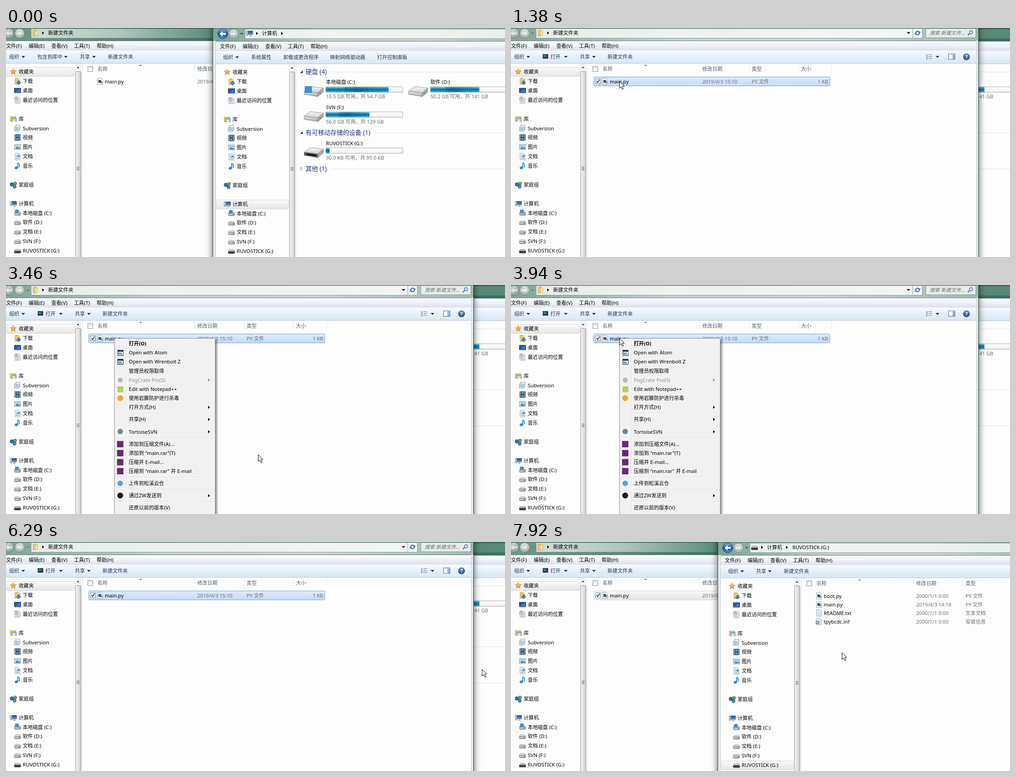
An HTML page with a canvas that plays this animation: 1101 px wide and 508 px high, repeating every 8 s.

```html
<!DOCTYPE html>
<html lang="zh-CN">
<head>
<meta charset="utf-8">
<style>
html, body { margin: 0; width: 100%; height: 100%; overflow: hidden; background: #fdfdfd; }
canvas { display: block; }
</style>
</head>
<body>
<canvas id="stage" width="1101" height="508"></canvas>
<script>
const ctx = document.getElementById('stage').getContext('2d');
const FONT = '"Noto Sans", "Noto Sans CJK SC", sans-serif';
const LOOP = 8000, PICK = 1380, SWITCH = 6360, OPEN = 7300;
const STICK = 'RUVOSTICK (G:)';
const GREY = '#6d6d6d', HEAD = '#4c607a', BAR = '#1e395b';

// Drawing helpers
function rect(x, y, w, h, fill, stroke) {
  if (fill) { ctx.fillStyle = fill; ctx.fillRect(x, y, w, h); }
  if (stroke) { ctx.strokeStyle = stroke; ctx.lineWidth = 1; ctx.strokeRect(x + .5, y + .5, w - 1, h - 1); }
}
function rounded(x, y, w, h, r, fill, stroke) {
  ctx.beginPath();
  ctx.roundRect(x + .5, y + .5, w - 1, h - 1, r);
  paint(fill, stroke);
}
function paint(fill, stroke, width = 1) {
  if (fill) { ctx.fillStyle = fill; ctx.fill(); }
  if (stroke) { ctx.strokeStyle = stroke; ctx.lineWidth = width; ctx.stroke(); }
}
function poly(pts, fill, stroke) {
  ctx.beginPath();
  for (let i = 0; i < pts.length; i += 2) ctx.lineTo(pts[i], pts[i + 1]);
  ctx.closePath();
  paint(fill, stroke);
}
function disc(x, y, r, fill, stroke, width) {
  ctx.beginPath();
  ctx.arc(x, y, r, 0, 7);
  paint(fill, stroke, width);
}
function line(x1, y1, x2, y2, color, width = 1) {
  ctx.beginPath();
  ctx.moveTo(x1, y1);
  ctx.lineTo(x2, y2);
  paint(null, color, width);
}
function shade(x0, y0, x1, y1, ...colors) {
  const g = ctx.createLinearGradient(x0, y0, x1, y1);
  colors.forEach((c, i) => g.addColorStop(i / (colors.length - 1), c));
  return g;
}
const vert = (y, h, ...colors) => shade(0, y, 0, y + h, ...colors);

// y is the middle of the line of text
function text(s, x, y, color = '#000', size = 11.1, style = '', align = 'left') {
  ctx.font = `${style} ${size}px ${FONT}`;
  ctx.textAlign = align;
  ctx.fillStyle = color;
  ctx.fillText(s, x, y + size * .37);
}
const down = (x, y, c = BAR) => poly([x - 4, y - 2, x + 4, y - 2, x, y + 2.5], c);
const right = (x, y, c = '#000') => poly([x - 2, y - 3.5, x + 2, y, x - 2, y + 3.5], c);

function checkbox(x, y, on) {
  rect(x, y, 12, 12, vert(y, 12, '#e4e6e8', '#fff'), '#8e8f8f');
  if (!on) return;
  ctx.beginPath();
  ctx.moveTo(x + 3, y + 6);
  ctx.lineTo(x + 5, y + 9);
  ctx.lineTo(x + 9.5, y + 2.5);
  paint(null, '#1f3a73', 1.7);
}

// Small icons, centred on 0,0
const page = () => poly([-5, -7, 3, -7, 6, -4, 6, 7, -5, 7], '#fbfcfd', '#8a9bab');
const lines = c => { for (let y = -3; y < 6; y += 2.5) line(-3, y, 4, y, c); };
const icons = {
  star() {
    const pts = [];
    for (let i = 0; i < 10; i++) {
      const r = i % 2 ? 3 : 7, a = i * Math.PI / 5 - Math.PI / 2;
      pts.push(r * Math.cos(a), r * Math.sin(a));
    }
    poly(pts, vert(-7, 14, '#ffd07a', '#f08a1c'), '#d9822b');
  },
  folder() {
    poly([-5, -6, 1, -7, 1, 6, -5, 7], '#f1cf6a', '#c99b3c');
    poly([-1, -4, 5, -5, 5, 5, -1, 7], '#fbe59b', '#d2a84c');
  },
  download() {
    icons.folder();
    poly([1, -1, 5, -1, 5, 3, 8, 3, 3, 8, -2, 3, 1, 3], '#2f8fe0', '#1d5fa8');
  },
  desktop() {
    rect(-7, -6, 15, 12, vert(-6, 12, '#2a63c4', '#163a86'), '#24405f');
    rect(-7, 4, 15, 2, '#6fa0d8');
    poly([-5, 3, 6, -4, 6, 3], 'rgba(110,190,255,.45)');
  },
  recent() {
    page(); lines('#7f98b0');
    disc(-3, -3, 3.5, '#eaf2f9', '#6d8499');
    line(-3, -5, -3, -3, '#345'); line(-3, -3, -1, -3, '#345');
  },
  library() {
    rect(-7, -6, 13, 11, '#f6d57d', '#c99b3c');
    rect(-4, -3, 11, 9, '#8cc8ee', '#4287b8');
    rect(-2, 1, 7, 5, '#fbe59b');
  },
  docs() {
    rect(-4, -7, 10, 11, '#fff', '#7f95ab');
    rect(-7, -3, 11, 10, '#f4f8fb', '#7f95ab');
    for (let y = 0; y < 6; y += 2) line(-5, y, 2, y, '#6b8cad');
  },
  video() {
    rect(-6, -7, 13, 14, '#243447');
    for (let y = -6; y < 7; y += 3) { rect(-5, y, 2, 2, '#d7e0e8'); rect(4, y, 2, 2, '#d7e0e8'); }
    rect(-2, -6, 5, 5, '#4f9bd0'); rect(-2, 1, 5, 5, '#4f9bd0');
  },
  picture() {
    rect(-7, -6, 15, 12, '#fff', '#7f8b96');
    rect(-5, -4, 11, 8, vert(-4, 8, '#7cc0f0', '#c8e8fa'));
    poly([-5, 4, -1, 0, 2, 2, 6, 1, 6, 4], '#31689a');
  },
  doc() { page(); lines('#6b8cad'); rect(1, -3, 4, 4, '#4f8fc8'); },
  music() {
    ctx.beginPath();
    ctx.ellipse(-2, 4, 4, 3, -.4, 0, 7);
    paint('#2b8bdc');
    line(1, 4, 1, -7, '#2b8bdc', 2);
    ctx.beginPath();
    ctx.moveTo(1, -7); ctx.quadraticCurveTo(7, -3, 4, 3);
    paint(null, '#2b8bdc', 2);
  },
  group() {
    disc(-3, -1, 4, '#2f6fb5', '#1d4f86');
    disc(4, -3, 3.5, '#63b04f', '#36733a');
    disc(3, 4, 3.5, '#3f8fd6', '#1d4f86');
  },
  computer() {
    rect(-7, -6, 4, 11, '#dde3e8', '#70808e');
    rect(-3, -6, 11, 9, vert(-6, 9, '#1a3f92', '#5ba3e6'), '#6b7c8c');
    rect(0, 4, 5, 2, '#8d9aa5');
  },
  disk(top = '#f2f2f2') {
    poly([-7, 0, -4, -3, 5, -3, 8, 0], top, '#8b8b8b');
    rounded(-7, 0, 15, 6, 2, vert(0, 6, '#e4e4e4', '#9c9c9c'), '#777');
    rect(3, 2, 3, 1, '#4a4a4a');
  },
  system() { icons.disk(); rect(-5, -7, 8, 7, '#3c8fd0'); },
  stick() { icons.disk('#d9d9d9'); rect(-7, 1, 15, 4, '#3d3d3d'); },
  py() { page(); rect(-3, -3, 6, 6, '#2d4a66'); rect(0, 0, 5, 4, '#6b7a4a'); },
  txt() { page(); lines('#9fb0bf'); },
  inf() { page(); lines('#9fb0bf'); disc(-3, 2, 3, '#cfd8df', '#66727c', 1.5); },
  app() {
    rect(-6, -6, 13, 13, '#fff', '#1c2c4c');
    rect(-5, -5, 11, 3, '#22355c');
    rect(-4, 0, 3, 3, '#44577e'); rect(0, 0, 3, 3, '#44577e'); rect(-4, 4, 9, 1, '#44577e');
  },
  cloud() { disc(0, 0, 5.5, '#b5b5b5'); },
  note() { rect(-6, -6, 13, 13, '#b9cf5a'); },
  guard() { disc(0, 0, 6.5, '#f6a623'); },
  svn() { disc(0, 0, 6, '#6f8799'); },
  rar() { rect(-7, -7, 14, 14, '#6b2a72'); },
  upload() { disc(0, 0, 6, '#4fa3e8'); },
  chat() { disc(0, 0, 6.5, '#1c1c1c'); }
};
function icon(name, x, y) {
  ctx.save();
  ctx.translate(x, y);
  icons[name]();
  ctx.restore();
}

const NAV = [
  ['star', '收藏夹', 1], ['download', '下载'], ['desktop', '桌面'], ['recent', '最近访问的位置'], null,
  ['library', '库', 1], ['docs', 'Subversion'], ['video', '视频'], ['picture', '图片'],
  ['doc', '文档'], ['music', '音乐'], null, ['group', '家庭组', 1], null,
  ['computer', '计算机', 1], ['system', '本地磁盘 (C:)'], ['disk', '软件 (D:)'],
  ['disk', '文档 (E:)'], ['disk', 'SVN (F:)'], ['stick', STICK]
];

function navPane(picked) {
  NAV.forEach((row, i) => {
    if (!row) return;
    const y = 97.2 + i * 20.88, top = row[2];
    if (i === picked) rounded(-8, Math.round(y) - 10, 160, 21, 2, vert(y - 10, 21, '#fafafa', '#e6e6e6'), '#d9d9d9');
    icon(row[0], top ? 16 : 25, Math.round(y));
    text(row[1], top ? 28 : 37, y);
  });
  rect(153, 79, 13, 440, '#f1f1f1');
  poly([156, 89, 162, 89, 159, 85.5], '#444');
  rounded(153, 96, 13, 440, 2, shade(153, 0, 166, 0, '#f7f7f7', '#e2e2e4', '#c6c6ca'), '#98989c');
  for (let y = 308; y < 316; y += 3) rect(156, y, 6, 1, '#555');
  rect(168, 79, 1, 440, '#d6e5f5');
}

function titleBar(w, active, isLeft, open) {
  const glass = active
    ? shade(0, 0, w, 0, '#7fa596', '#c3d2cc', '#c9d6d1', '#9dbbb0')
    : shade(0, 0, 456, 0, '#6f9888', '#5c8b7a', '#39735f');
  rect(-15, -20, w + 14, 540, glass);
  rect(-15, 0, w + 14, 1, 'rgba(30,70,60,.5)');
  rect(-15, 28, 6, 500, shade(-15, 0, -9, 0, '#f6fafa', '#cbd8d8'));
  rect(w - 6, 28, 5, 500, shade(w - 6, 0, w - 1, 0, '#cfdcdc', '#eef4f4'));

  const blue = !isLeft && active;
  disc(6, 12, 11, blue ? vert(1, 22, '#8fb9e8', '#174f9f', '#3f9be0') : vert(1, 22, '#c8d3d0', '#8fa39d'), blue ? '#1c3c6c' : '#66817a');
  poly([-1, 12, 6, 6, 6, 10, 13, 10, 13, 14, 6, 14, 6, 18], blue ? '#fff' : '#dfe7e5');
  disc(30, 12, 10.5, vert(1, 22, '#dce3e1', '#a1b2ad'), '#728a83');
  poly([36, 12, 30, 7, 30, 10, 24, 10, 24, 14, 30, 14, 30, 17], '#e8eeec');
  down(48, 12, blue ? '#1f5fa8' : '#6f857e');

  const fieldW = isLeft ? 853 : 700;
  const field = active
    ? shade(55, 0, 900, 0, 'rgba(255,255,255,.8)', 'rgba(255,255,255,.68)', 'rgba(255,255,255,.85)')
    : shade(55, 0, 456, 0, 'rgba(255,255,255,.68)', 'rgba(255,255,255,.5)', 'rgba(255,255,255,.16)');
  rect(55, 1, fieldW, 22, field, 'rgba(70,90,85,.55)');
  icon(isLeft ? 'folder' : open ? 'stick' : 'computer', 65, 11);
  right(82, 11);
  text(isLeft ? '新建文件夹' : '计算机', 93, 11);
  if (!isLeft) {
    right(137, 11);
    if (open) text(STICK, 149, 11);
    return;
  }
  down(877, 11, '#222');
  rect(886, 2, 1, 20, '#8a9a95');
  disc(897, 11, 4, null, '#2b63ad', 2);
  poly([899, 8, 904, 8, 901.5, 12], '#2b63ad');
  poly([890, 14, 895, 14, 892.5, 10], '#2b63ad');
  rect(915, 1, 111, 21, 'rgba(255,255,255,.72)', 'rgba(70,90,85,.55)');
  text('搜索 新建文件...', 924, 11, GREY, 11, 'italic');
  disc(1015, 9.5, 3.5, null, '#3a6ea5', 1.5);
  line(1012, 12, 1008, 16, '#3a6ea5', 2);
}

function toolBar(w, items) {
  rect(-9, 28, w + 3, 1, '#66777a');
  rect(-9, 29, w + 3, 21, vert(29, 21, '#fdfdff', '#eef1f9', '#dce1f0'));
  ['文件(F)', '编辑(E)', '查看(V)', '工具(T)', '帮助(H)'].forEach((s, i) => text(s, i * 50, 40));
  rect(-9, 50, w + 3, 28, vert(50, 28, '#f8fbfe', '#e6eff9', '#d9e7f5'));
  rect(-9, 78, w + 3, 1, '#b5c8dd');
  for (const [s, x, arrow] of items) {
    text(s, x, 64, BAR);
    if (arrow) down(arrow, 64);
  }
}

function listHead() {
  checkbox(180, 85);
  poly([294, 84, 300, 84, 297, 81], '#4a7a9c');
  [['名称', 202, 416], ['修改日期', 422, 525], ['类型', 531, 634], ['大小', 640, 707]].forEach(([s, x, edge]) => {
    text(s, x, 91, HEAD);
    rect(edge, 80, 1, 18, '#dfe9f3');
  });
}
function fileRow(y, kind, name, date, type, size) {
  icon(kind, 207, y);
  text(name, 218, y);
  text(date, 422, y, GREY);
  text(type, 531, y, GREY);
  if (size) text(size, 700, y, GREY, 11.1, '', 'right');
}

function bigDisk(x, y, system, stick) {
  poly([x - 21, y, x - 8, y - 10, x + 21, y - 7, x + 9, y + 4], vert(y - 10, 14, '#f7f7f7', '#cfcfcf'), '#9a9a9a');
  poly([x - 21, y, x + 9, y + 4, x + 9, y + 12, x - 21, y + 7], stick ? '#4b4b4b' : vert(y, 12, '#ececec', '#a5a5a5'), '#8b8b8b');
  poly([x + 9, y + 4, x + 21, y - 7, x + 21, y + 2, x + 9, y + 12], '#a9a9a9', '#858585');
  if (stick) poly([x - 15, y + 3, x + 5, y + 6, x + 5, y + 9, x - 15, y + 6], '#111');
  else rect(x + 13, y + 3, 3, 3, '#4cae3c');
  if (system) rect(x - 20, y - 11, 16, 15, '#3c8fd0');
}
function drive(x, y, name, free, used, system, stick) {
  bigDisk(x - 27, y + 20, system, stick);
  text(name, x, y);
  rounded(x - 1, y + 10, 171, 13, 1, vert(y + 10, 13, '#fff', '#f0f0f0'), '#a8a8a8');
  rect(x, y + 11, used, 11, vert(y + 11, 11, '#7fd0e6', '#2a9cc6', '#0c6a98', '#1790bd', '#35b4d6'));
  rect(x + used * .3, y + 11, used * .7, 11, shade(x, 0, x + used, 0, 'rgba(5,60,110,0)', 'rgba(5,60,110,.4)', 'rgba(40,150,190,.1)'));
  text(free, x, y + 32, GREY);
}
function heading(s, y, end, closed) {
  if (closed) poly([178.5, y - 4, 182.5, y, 178.5, y + 4], '#fff', '#8a8a8a');
  else poly([177, y + 3, 183, y + 3, 183, y - 3], '#333');
  text(s, 189, y, '#1e3287', 13.7);
  rect(end, y, 500, 1, '#e2e2e2');
}
function driveView(t, tip) {
  heading('硬盘 (4)', 96, 245);
  drive(234, 119, '本地磁盘 (C:)', '10.5 GB 可用，共 54.7 GB', 138, true);
  drive(464.5, 119, '软件 (D:)', '50.2 GB 可用，共 141 GB', 108);
  drive(234, 174.5, 'SVN (F:)', '56.0 GB 可用，共 129 GB', 96);
  heading('有可移动存储的设备 (1)', 231, 339);
  const over = t > SWITCH && tip && tip[0] > 655 && tip[0] < 881 && tip[1] > 246 && tip[1] < 297;
  if (over) rounded(182, 245, 228, 52, 2, vert(245, 52, '#fdfeff', '#eef5fd'), '#b8d6fb');
  drive(234, 254.5, STICK, '90.0 KB 可用，共 95.0 KB', 8, false, true);
  if (over) checkbox(186, 248);
  if (t >= SWITCH) rect(170, 299, 600, 25, null, '#7da9dc');
  heading('其他 (1)', 311, 245, true);
}

function openWindow(x, y, w, draw) {
  ctx.save();
  ctx.translate(x, y);
  ctx.shadowColor = 'rgba(0,0,0,.65)';
  ctx.shadowBlur = 14;
  rect(-16, -20, w + 16, 600, '#33413f');
  ctx.shadowColor = 'transparent';
  draw();
  ctx.restore();
}

function leftWindow(t, active, tip) {
  const w = 1032, picked = t >= PICK;
  openWindow(0, 0, w, () => {
    titleBar(w, active, true);
    rect(-9, 28, w + 3, 500, '#fdfdfd');
    toolBar(w, picked
      ? [['组织', 7, 38], ['打开', 87, 121], ['共享', 152, 183], ['新建文件夹', 213]]
      : [['组织', 7, 38], ['包含到库中', 69, 132], ['共享', 163, 194], ['新建文件夹', 225]]);
    if (picked) { rect(70, 58, 12, 10, '#1f4a5c', '#23313c'); rect(72, 60, 5, 4, '#3f8f78'); }
    for (let y = 59; y < 70; y += 4) { rect(916, y, 3, 2, '#5f7690'); rect(921, y, 8, 1, '#5f7690'); }
    down(941, 64);
    rect(965, 57, 15, 13, '#fff', '#46688c');
    rect(974, 59, 5, 10, '#8fbbe4');
    disc(1005, 64, 7, vert(57, 14, '#6f9cd0', '#1d4a86'), '#2a4668');
    text('?', 1005, 64, '#fff', 11, 'bold', 'center');
    navPane(0);
    listHead();
    const over = !picked && tip && tip[0] > 182 && tip[0] < 456 && tip[1] > 108 && tip[1] < 130;
    if (picked && active) rounded(182, 108, 522, 21, 2, vert(108, 21, '#dcebfd', '#c1dbfc'), '#7da2ce');
    else if (picked) rounded(182, 108, 522, 21, 2, vert(108, 21, '#f8f8f8', '#e6e6e6'), '#d9d9d9');
    else if (over) rounded(182, 108, 522, 21, 2, vert(108, 21, '#fafbfd', '#ebf3fd'), '#b8d6fb');
    if (picked || over) checkbox(186, 112, picked);
    fileRow(118.5, 'py', 'main.py', '2019/4/3 15:10', 'PY 文件', '1 KB');
  });
}

function rightWindow(t, active, tip) {
  const w = 700, open = t >= OPEN;
  openWindow(472, 1, w, () => {
    titleBar(w, active, false, open);
    rect(-9, 28, w + 3, 500, '#fdfdfd');
    toolBar(w, open
      ? [['组织', 7, 38], ['共享', 69, 99], ['新建文件夹', 130]]
      : [['组织', 7, 38], ['系统属性', 69], ['卸载或更改程序', 140], ['映射网络驱动器', 243], ['打开控制面板', 347]]);
    navPane(open ? 19 : 14);
    if (!open) return driveView(t, tip);
    listHead();
    [['py', 'boot.py', '2000/1/1 0:00', 'PY 文件'], ['py', 'main.py', '2019/4/3 14:18', 'PY 文件'],
      ['txt', 'README.txt', '2000/1/1 0:00', '文本文档'], ['inf', 'tpybcdc.inf', '2000/1/1 0:00', '安装信息']]
      .forEach((f, i) => fileRow(118.5 + i * 19, ...f));
  });
}

// label, icon, has submenu; null is a separator
const MENU = [
  ['打开(O)'], ['Open with Atom', 'app'], ['Open with Wrenbolt Z', 'app'], ['管理员权限取得'],
  ['FogCrate Pro(S)', 'cloud', 1], ['Edit with Notepad++', 'note'], ['使用岩藤防护进行杀毒', 'guard'],
  ['打开方式(H)', '', 1], null, ['共享(H)', '', 1], null, ['TortoiseSVN', 'svn', 1], null,
  ['添加到压缩文件(A)...', 'rar'], ['添加到 "main.rar"(T)', 'rar'], ['压缩并 E-mail...', 'rar'],
  ['压缩到 "main.rar" 并 E-mail', 'rar'], null, ['上传到松溪云仓', 'upload'], null,
  ['通过ZW发送到', 'chat', 1], null, ['还原以前的版本(V)']
];
function contextMenu(alpha, tip) {
  ctx.save();
  ctx.globalAlpha = alpha;
  ctx.shadowColor = 'rgba(0,0,0,.5)';
  ctx.shadowBlur = 5;
  ctx.shadowOffsetX = ctx.shadowOffsetY = 3;
  rect(239, 118, 223, 420, '#f0f0f0');
  ctx.shadowColor = 'transparent';
  rect(239, 118, 223, 420, '#f1f1f1', '#979797');
  rect(266, 120, 1, 400, '#e2e3e3');
  rect(267, 120, 1, 400, '#fff');
  let y = 130;
  MENU.forEach((item, i) => {
    if (!item) {
      rect(268, Math.round(y - 7), 190, 1, '#dcdcdc');
      rect(268, Math.round(y - 6), 190, 1, '#fff');
      y += 6.9;
      return;
    }
    const [label, pic, sub] = item, color = pic === 'cloud' ? '#8b8b8b' : '#000';
    if (tip && tip[1] > 125 && Math.abs(tip[1] - y) < 10 && tip[0] > 241 && tip[0] < 459)
      rounded(241, Math.round(y) - 10, 218, 20, 2, vert(y - 10, 20, '#edf3fa', '#dbe8f6'), '#aecff7');
    if (pic) icon(pic, 252, Math.round(y));
    text(label, 271, y, color, 11.1, i ? '' : 'bold');
    if (sub) right(448, y, color);
    y += 20.18;
  });
  ctx.restore();
}

// Pointer keys: time, x, y
const TRACKS = [
  [[350, 781, 480], [740, 300, 88], [1130, 466, 374], [1220, 239, 112], [1380, 239, 118], [2830, 239, 118],
    [3230, 320, 325], [3550, 805, 429], [3630, 239, 118], [5020, 239, 118]],
  [[5350, 1089, 320], [5740, 921, 398], [6130, 1050, 288], [6210, 1050, 282], [6590, 1050, 282], [6840, 758, 257],
    [7520, 758, 255], [7750, 730, 235], [7840, 730, 235], [7920, 730, 245], [LOOP, 730, 245]]
];
const TICK = 78;
function pointer(t) {
  for (const keys of TRACKS)
    for (let i = 1; i < keys.length; i++) {
      const [t0, x0, y0] = keys[i - 1], [t1, x1, y1] = keys[i];
      if (t < t0 || t >= t1) continue;
      const p = Math.floor((t - t0) / TICK) * TICK / (t1 - t0);
      return [Math.round(x0 + (x1 - x0) * p), Math.round(y0 + (y1 - y0) * p)];
    }
  return null;
}
function arrow([x, y]) {
  ctx.save();
  ctx.translate(x + .5, y + .5);
  poly([0, 0, 0, 15, 3.4, 11.8, 6, 17.5, 8.4, 16.4, 5.9, 10.9, 10.4, 10.6], '#fff', '#000');
  ctx.restore();
}

function draw(t) {
  const tip = pointer(t), leftFront = t >= PICK && t < SWITCH;
  rect(0, 0, 1101, 508, '#39735f');
  if (leftFront) {
    rightWindow(t, false, null);
    leftWindow(t, true, tip);
  } else {
    leftWindow(t, false, tip);
    rightWindow(t, true, tip);
  }
  if (t >= 2120 && t < 5020) contextMenu(t < 2210 ? .35 : t < 2300 ? .7 : 1, tip);
  if (tip) arrow(tip);
}

const start = performance.now();
function loop() {
  draw((performance.now() - start) % LOOP);
  requestAnimationFrame(loop);
}
loop();
</script>
</body>
</html>
```
